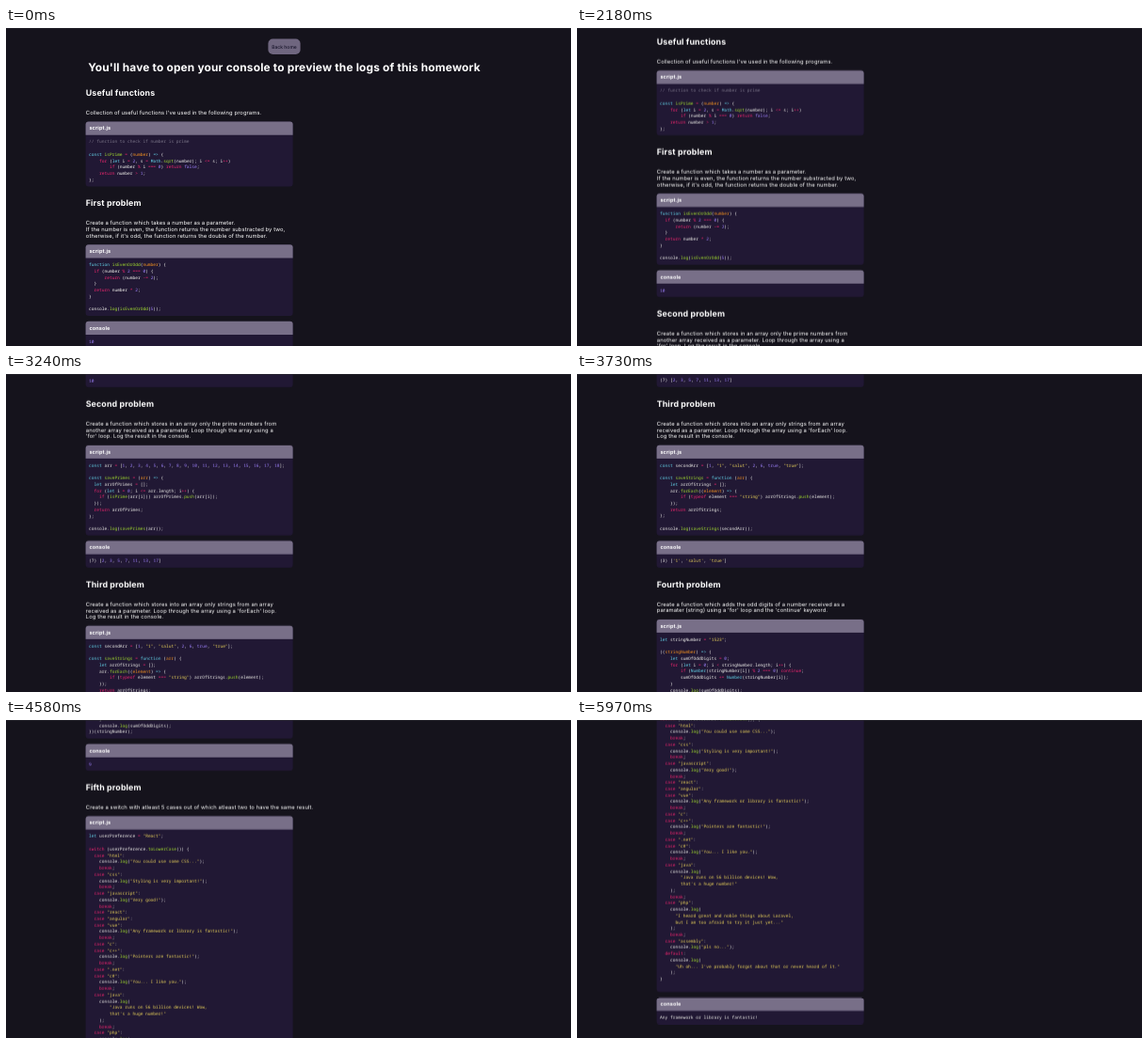
Animation of 600 by 338 pixels, one loop 6 s. Source, as an HTML page:

```html
<!DOCTYPE html>
<html lang="en">
<head>
<meta charset="utf-8">
<title>Homework</title>
<style>
  html, body { margin: 0; width: 100%; height: 100%; overflow: hidden; background: #15131c; }
  svg { display: block; width: 600px; height: 338px; }
  text { white-space: pre; fill: #fff; text-rendering: geometricPrecision; font-family: Inter, sans-serif; }
  .h1, .h2, .bar { font-weight: 700; letter-spacing: .015em; }
  .h1 { font-size: 11.9px; text-anchor: middle; }
  .h2 { font-size: 8.85px; }
  .p { font-size: 5.8px; letter-spacing: .018em; }
  .bar { font-size: 5.55px; }
  .btn { font-size: 5px; font-weight: 500; text-anchor: middle; fill: #17142a; }
  .code { font: 500 4.56px "Noto Sans Mono", "DejaVu Sans Mono", monospace; fill: #f8f8f2; }
  .com { fill: #7a7488; }
  .str { fill: #f0d85c; }
  .par { fill: #fd971f; }
  .fn { fill: #a6e22e; }
  .key { fill: #66d9ef; }
  .num { fill: #a184ff; }
  .op { fill: #f92672; }

  #page { animation: scroll 6s infinite; }
  @keyframes scroll {
    0%, 21% { transform: translateY(0); animation-timing-function: cubic-bezier(.333, 0, .667, .333); }
    27.833% { transform: translateY(-14px); animation-timing-function: cubic-bezier(.333, .199, .667, .348); }
    44% { transform: translateY(-128.1px); animation-timing-function: cubic-bezier(.333, .233, .667, .605); }
    54% { transform: translateY(-325.8px); animation-timing-function: linear; }
    69.667% { transform: translateY(-694.1px); animation-timing-function: linear; }
    82.333%, 100% { transform: translateY(-986.4px); }
  }
</style>
</head>
<body>
<svg viewBox="0 0 600 338">
  <rect width="600" height="338" fill="#15131c"/>
  <g id="page">
    <rect x="278.4" y="11.5" width="34.2" height="16.4" rx="5" fill="#6f667f"/>
    <text class="btn" x="295.5" y="21.6">Back home</text>
    <text class="h1" x="295.5" y="46.2">You'll have to open your console to preview the logs of this homework</text>
  </g>
  <rect width="600" height=".6" fill="#2b2a31"/>
</svg>
<script>
const sections = [
  {
    title: "Useful functions",
    about: "Collection of useful functions I've used in the following programs.",
    code: `// function to check if number is prime

const isPrime = (number) => {
    for (let i = 2, s = Math.sqrt(number); i <= s; i++)
        if (number % i === 0) return false;
    return number > 1;
};`
  },
  {
    title: "First problem",
    about: `Create a function which takes a number as a parameter.
If the number is even, the function returns the number substracted by two,
otherwise, if it's odd, the function returns the double of the number.`,
    code: `function isEvenOrOdd(number) {
  if (number % 2 === 0) {
      return (number -= 2);
  }
  return number * 2;
}

console.log(isEvenOrOdd(5));`,
    output: "10"
  },
  {
    title: "Second problem",
    about: `Create a function which stores in an array only the prime numbers from
another array received as a parameter. Loop through the array using a
'for' loop. Log the result in the console.`,
    code: `const arr = [1, 2, 3, 4, 5, 6, 7, 8, 9, 10, 11, 12, 13, 14, 15, 16, 17, 18];

const savePrimes = (arr) => {
  let arrOfPrimes = [];
  for (let i = 0; i <= arr.length; i++) {
    if (isPrime(arr[i])) arrOfPrimes.push(arr[i]);
  });
  return arrOfPrimes;
};

console.log(savePrimes(arr));`,
    output: "(7) [2, 3, 5, 7, 11, 13, 17]"
  },
  {
    title: "Third problem",
    about: `Create a function which stores into an array only strings from an array
received as a parameter. Loop through the array using a 'forEach' loop.
Log the result in the console.`,
    code: `const secondArr = [1, "1", "salut", 2, 6, true, "true"];

const saveStrings = function (arr) {
    let arrOfStrings = [];
    arr.forEach((element) => {
        if (typeof element === "string") arrOfStrings.push(element);
    });
    return arrOfStrings;
};

console.log(saveStrings(secondArr));`,
    output: "(3) ['1', 'salut', 'true']"
  },
  {
    title: "Fourth problem",
    about: `Create a function which adds the odd digits of a number received as a
paramater (string) using a 'for' loop and the 'continue' keyword.`,
    code: `let stringNumber = "1523";

((stringNumber) => {
    let sumOfOddDigits = 0;
    for (let i = 0; i < stringNumber.length; i++) {
        if (Number(stringNumber[i]) % 2 === 0) continue;
        sumOfOddDigits += Number(stringNumber[i]);
    }
    console.log(sumOfOddDigits);
})(stringNumber);`,
    output: "9"
  },
  {
    title: "Fifth problem",
    about: "Create a switch with atleast 5 cases out of which atleast two to have the same result.",
    code: `let userPreference = "React";

switch (userPreference.toLowerCase()) {
  case "html":
    console.log("You could use some CSS...");
    break;
  case "css":
    console.log("Styling is very important!");
    break;
  case "javascript":
    console.log("Very good!");
    break;
  case "react":
  case "angular":
  case "vue":
    console.log("Any framework or library is fantastic!");
    break;
  case "c":
  case "c++":
    console.log("Pointers are fantastic!");
    break;
  case ".net":
  case "c#":
    console.log("You... I like you.");
    break;
  case "java":
    console.log(
        "Java runs on 56 billion devices! Wow,
        that's a huge number!"
    );
    break;
  case "php":
    console.log(
      "I heard great and noble things about Laravel,
      but I am too afraid to try it just yet..."
    );
    break;
  case "assembly":
    console.log("pls no...");
  default:
    console.log(
      "Uh oh... I've probably forgot about that or never heard of it."
    );
}
`,
    output: "Any framework or library is fantastic!"
  }
];

const token = new RegExp([
  /(?<plain>^\(\d\))/,
  /(?<com>\/\/.*)/,
  /(?<str>^[^"]+"$|"[^"]*"?|'[^']*')/,
  /(?<par>(?<=\()\w+(?=\) (?:=>|\{)))/,
  /(?<fn>\b(?:isPrime|isEvenOrOdd|savePrimes|saveStrings|log|sqrt|push|forEach|toLowerCase)\b)/,
  /(?<key>\b(?:const|let|function|Math|Number)\b|=>)/,
  /(?<num>\b(?:\d+|true|false)\b)/,
  /(?<op>\b(?:for|if|return|switch|case|break|default|continue|typeof)\b|[=%*+<>-]+)/,
  /(?<rest>\w+|\s+|.)/
].map(r => r.source).join("|"), "g");

const LEFT = 84.6, WIDTH = 220, BAR = 14.2, LINE = 6.74, PAD = 88.1;
const page = document.getElementById("page");

function add(tag, attrs, parent = page) {
  const el = document.createElementNS("http://www.w3.org/2000/svg", tag);
  for (const name in attrs) el.setAttribute(name, attrs[name]);
  return parent.appendChild(el);
}

function label(cls, x, y, str) {
  add("text", { class: cls, x, y }).textContent = str;
}

function codeLine(str, y) {
  const text = add("text", { class: "code", x: PAD, y });
  for (const m of str.matchAll(token)) {
    const cls = Object.keys(m.groups).find(k => m.groups[k] !== undefined);
    if (cls === "rest" || cls === "plain") text.append(m[0]);
    else add("tspan", { class: cls }, text).textContent = m[0];
  }
}

// Draws a titled panel and returns its bottom edge.
function panel(title, body, top) {
  const lines = body.split("\n");
  const first = top + 21.4;
  const end = first + (lines.length - 1) * LINE + 7.1;
  add("rect", { x: LEFT, y: top, width: WIDTH, height: end - top, rx: 3, fill: "#211834" });
  add("path", {
    d: `M${LEFT} ${top + BAR}v${3 - BAR}q0-3 3-3h${WIDTH - 6}q3 0 3 3v${BAR - 3}z`,
    fill: "#786f88"
  });
  label("bar", 88.4, top + 8.8, title);
  lines.forEach((str, i) => codeLine(str, first + i * LINE + 1.4));
  return end;
}

let y = 69;
for (const { title, about, code, output } of sections) {
  label("h2", 84.7, y + 3, title);
  y += 21.1;
  const lines = about.split("\n");
  lines.forEach((str, i) => label("p", 84.8, y + i * LINE + 2, str));
  y = panel("script.js", code, y + (lines.length - 1) * LINE + 9.5);
  if (output) y = panel("console", output, y + 5.8);
  y += 17.6;
}
</script>
</body>
</html>
```
